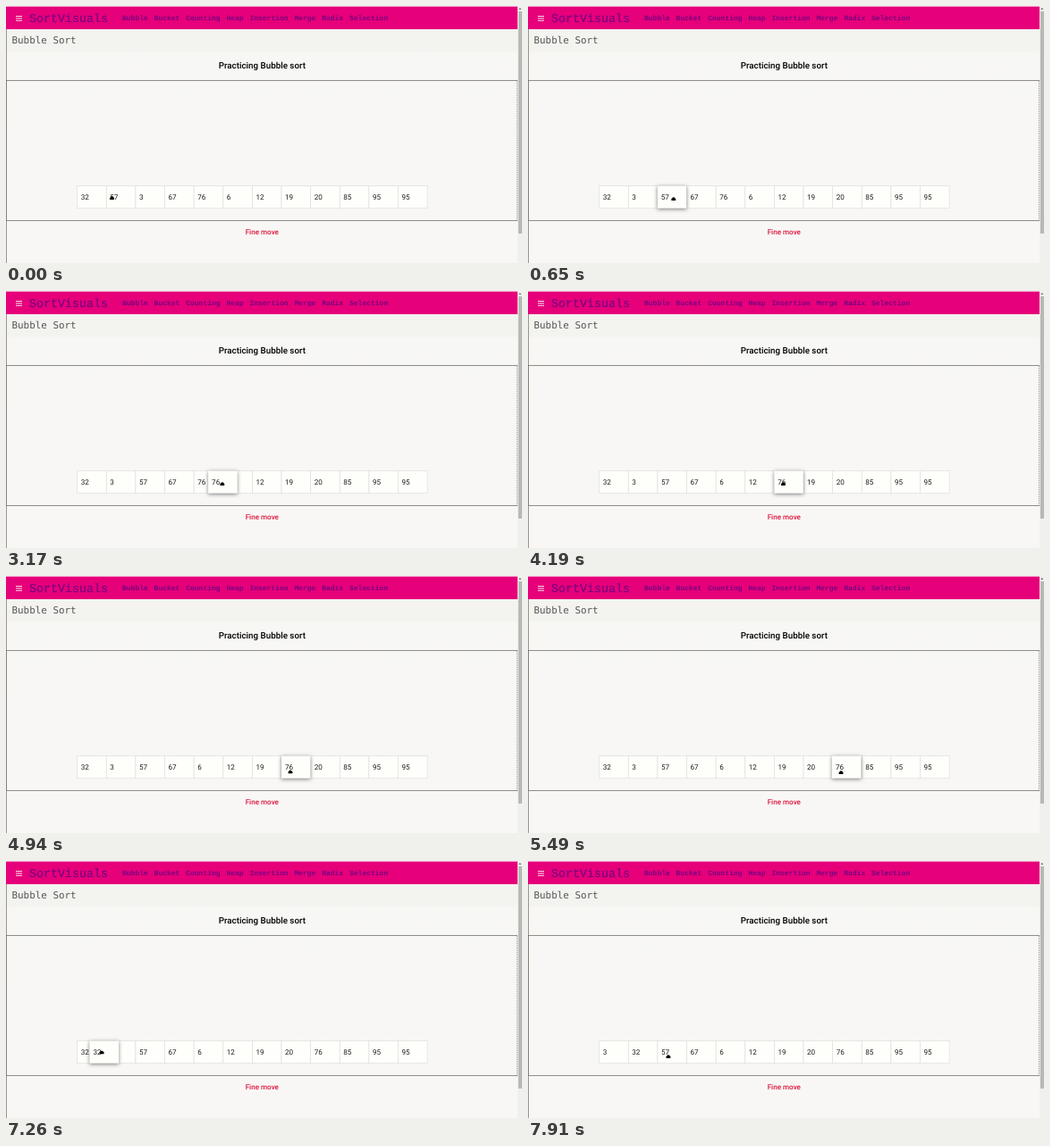
Write an HTML page that moves like this. It is 577 by 288 pixels and loops after 8000 ms.

```html
<!DOCTYPE html>
<html lang="en">
<head>
<meta charset="utf-8">
<title>Bubble sort practice</title>
<style>
  html, body { margin: 0; width: 100%; height: 100%; overflow: hidden; }
  svg { display: block; width: 577px; height: 288px; font: 8.1px Roboto, sans-serif; text-rendering: geometricPrecision; }
  .mono { font-family: "Liberation Mono", monospace; fill: #780080; }
  .cell rect { fill: #fefefb; stroke: #e2e2e0; stroke-width: .8; }
  .cell text { fill: #1c1c1c; }
  #card { filter: drop-shadow(0 1.4px 2px rgba(0, 0, 0, .5)); }
  #card rect { stroke: none; }
</style>
</head>
<body>
<svg viewBox="0 0 577 288" xmlns="http://www.w3.org/2000/svg">
  <defs>
    <linearGradient id="page" x2="0" y2="1">
      <stop stop-color="#f7f7f4"/>
      <stop offset="1" stop-color="#f9f7f6"/>
    </linearGradient>
  </defs>
  <rect width="577" height="288" fill="url(#page)"/>
  <rect y="26" width="572" height="25.5" fill="#f3f3f0"/>
  <rect y=".6" width="572" height="25.4" fill="#e6007a"/>
  <path d="M11 11.5h7M11 13.9h7M11 16.3h7" stroke="#f8dcea"/>
  <text class="mono" x="26" y="17.6" font-size="13.33" stroke="#780080" stroke-width=".2">SortVisuals</text>
  <g id="nav" class="mono" font-weight="bold"></g>
  <text x="6.5" y="42" font-size="10.9" fill="#555" style="font-family:'DejaVu Sans Mono',monospace">Bubble Sort</text>
  <text x="286.3" y="70.2" font-size="9.8" font-weight="500" text-anchor="middle">Practicing Bubble sort</text>
  <rect x=".5" y="83.5" width="571.5" height="157" fill="none" stroke="#222" stroke-dasharray="1 1"/>
  <rect y="26" width=".8" height="262" fill="#8a7a70"/>
  <rect x="572" width="5" height="288" fill="#f0f0ee"/>
  <rect x="572.9" y="6" width="4.1" height="249" fill="#b8b8b6"/>
  <path d="M573.2 4l1.6-2 1.6 2z" fill="#777"/>
  <g id="list"></g>
  <g id="card" class="cell"></g>
  <text x="286.3" y="256.3" font-weight="500" text-anchor="middle" fill="#dc143c">Fine move</text>
  <path id="hand" d="M-2.4 2C-2.9 .6-2.3-.6-1.4-.8C-1-1.8-.4-2 .3-1.4C1-1.6 1.5-1.2 1.6-.6C2.5-.4 2.6.9 2.2 2Z"/>
  <path id="arrow" d="M0 0V5L1.2 4L2 5.8L2.9 5.4L2 3.6H3.5Z" fill="#111"/>
</svg>
<script>
const LOOP = 8000, STEP = 93.1, LEFT = 79.7, CELL = 32.62;
const start = [32, 57, 3, 67, 76, 6, 12, 19, 20, 85, 95, 95];

// Moves run between two steps; a drag carries the item in a slot one place right.
const hover = (first, last, x, y) => ({ first, last, x, y });
const drag = (first, last, slot, y = 216) => ({ first, last, slot, y });
const moves = [
  hover(0, 1, 130.5, 216),
  drag(3, 8, 1),
  hover(16, 24, 226, 216),
  drag(33, 38, 4),
  hover(38, 39, 253, 216),
  drag(40, 46, 5),
  drag(48, 54, 6, 220),
  drag(54, 61, 7, 220),
  hover(61, 66, 209.5, 197),
  hover(67, 71, 92.5, 209.5),
  hover(72, 75, 93.5, 214),
  drag(77, 83, 0),
  hover(83, 85, 157, 219)
];

const $ = id => document.getElementById(id);
const slotX = i => LEFT + i * CELL;
const easeOut = k => 1 - (1 - k) ** 3;
const cell = (value, x) =>
  `<rect x="${x}" y="201.5" width="${CELL}" height="25.2"/><text x="${x + 4}" y="216.9">${value}</text>`;

function stateAt(step) {
  const state = { x: 118.5, y: 215, order: [...start], card: "" };
  const { order } = state;
  for (const { first, last, slot, x, y } of moves) {
    if (step <= first) break;
    const k = Math.min(1, (step - first) / (last - first));
    state.y += (y - state.y) * k;
    if (slot === undefined) {
      state.x += (x - state.x) * k;
      continue;
    }
    const shift = CELL * easeOut(k), value = order[slot];
    state.x += shift;
    if (shift > CELL / 2) [order[slot], order[slot + 1]] = [order[slot + 1], value];
    if (k < 1) state.card = cell(value, slotX(slot) + shift);
  }
  return state;
}

function place(id, x, y, shown) {
  $(id).setAttribute("transform", `translate(${x} ${y})`);
  $(id).setAttribute("visibility", shown ? "visible" : "hidden");
}

function render(step) {
  const { x, y, order, card } = stateAt(step);
  $("list").innerHTML = `<g class="cell">${order.map((v, i) => cell(v, slotX(i))).join("")}</g>`;
  $("card").innerHTML = card;
  const overList = y > 201;
  place("hand", x, y, overList);
  place("arrow", x, y, !overList);
}

let navX = 130;
for (const name of "Bubble Bucket Counting Heap Insertion Merge Radix Selection".split(" ")) {
  $("nav").innerHTML += `<text x="${navX}" y="15.7" font-size="8">${name}</text>`;
  navX += name.length * 4.8 + 6.8;
}

let shownStep = -1;
function tick(now) {
  const step = Math.min(85, Math.floor((now % LOOP + 10) / STEP));
  if (step !== shownStep) render(shownStep = step);
  requestAnimationFrame(tick);
}
render(0);
requestAnimationFrame(tick);
</script>
</body>
</html>
```
